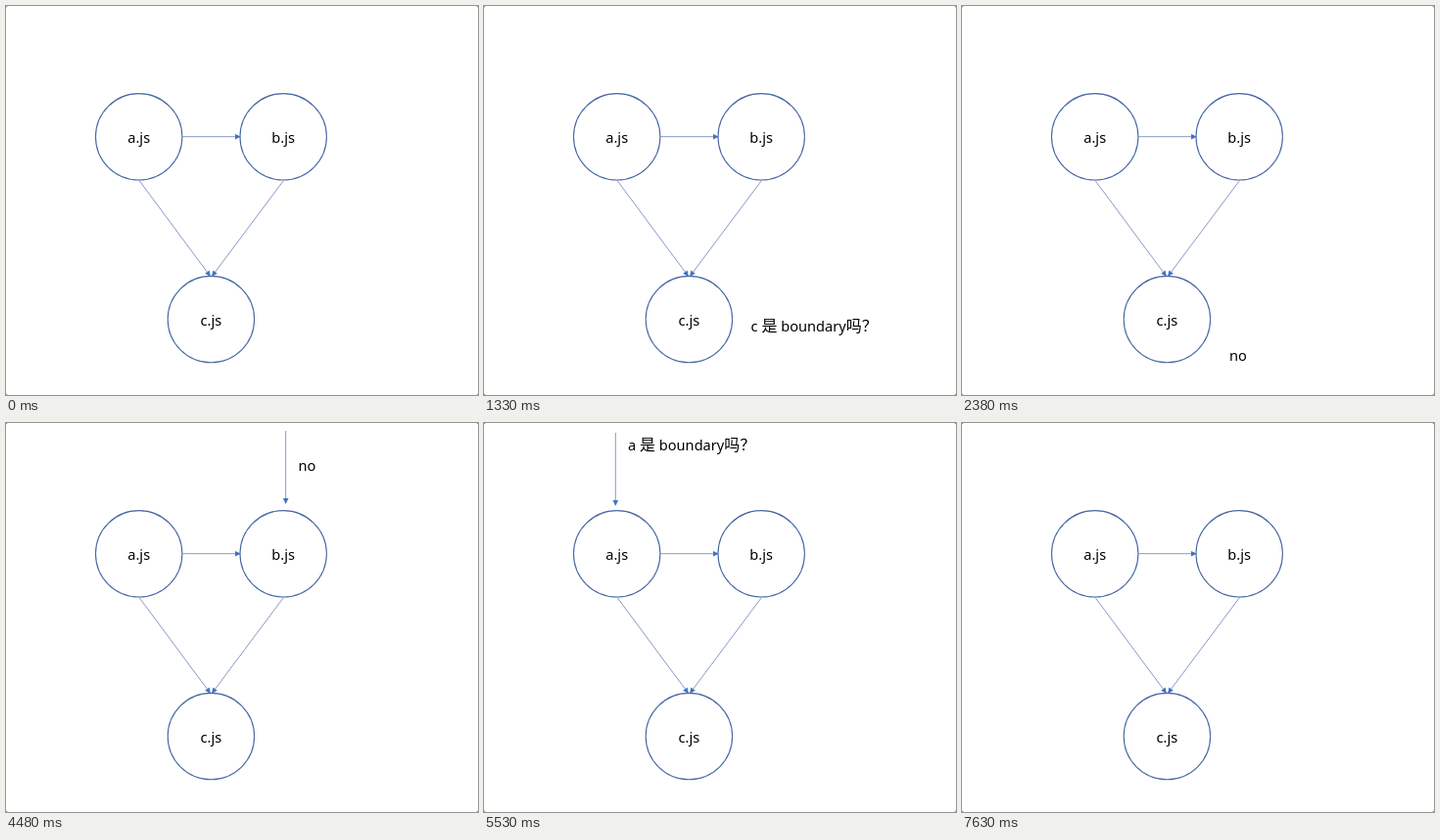
An HTML page for the animation above (8 s loop, 482 px wide and 398 px high).

```html
<!DOCTYPE html>
<html lang="zh">
<head>
<meta charset="utf-8">
<title>Module update</title>
<style>
  html, body { margin: 0; width: 100%; height: 100%; overflow: hidden; background: #fff; }
  svg { display: block; width: 482px; height: 398px; }
  text { font: 14.6px "Noto Sans", "Noto Sans CJK SC", "Noto Sans CJK", sans-serif; fill: #000; white-space: pre; }
  .han { font: 16px "Noto Sans CJK SC", "Noto Sans CJK", sans-serif; }
  .node text { text-anchor: middle; }
  circle { fill: #fff; stroke: #4868a4; stroke-width: 1.1; }
  .line { stroke: #6680b8; stroke-width: .8; }
  .head { fill: #4472c4; }
</style>
</head>
<body>
<svg id="stage" viewBox="0 0 482 398"></svg>
<script>
const LOOP = 8000, FIRST = 280, STEP = 1050;
const stage = document.getElementById('stage');

function add(name, attrs, parent = stage, content = '') {
  const el = document.createElementNS('http://www.w3.org/2000/svg', name);
  for (const key in attrs) el.setAttribute(key, attrs[key]);
  el.textContent = content;
  parent.appendChild(el);
  return el;
}

function node(x, y, label) {
  const g = add('g', { class: 'node' });
  add('circle', { cx: x, cy: y, r: 44.2 }, g);
  add('text', { x, y: y + 6 }, g, label);
}

function arrow(x1, y1, x2, y2) {
  const g = add('g', {});
  const angle = Math.atan2(y2 - y1, x2 - x1);
  const bx = x2 - 5 * Math.cos(angle), by = y2 - 5 * Math.sin(angle);
  add('line', { class: 'line', x1, y1, x2: bx, y2: by }, g);
  add('path', {
    class: 'head', d: 'M0 0L-6-2.8V2.8Z',
    transform: `translate(${x2} ${y2}) rotate(${angle * 180 / Math.PI})`
  }, g);
  return g;
}

// Chinese runs are set slightly larger than the Latin ones.
function note(x, y, words) {
  const text = add('text', { x, y });
  for (const run of words.match(/[\u3000-\uffff]+|[^\u3000-\uffff]+/g))
    add('tspan', run.charCodeAt(0) > 0x2fff ? { class: 'han' } : {}, text, run);
  return text;
}

const ask = (x, y, name) => note(x, y, name + ' 是 boundary吗？');

// Corners of the rounded slide
add('path', {
  fill: '#666',
  d: 'M0 0H2Q0 0 0 2ZM482 0V2Q482 0 480 0ZM0 398V396Q0 398 2 398ZM482 398H480Q482 398 482 396Z'
});

node(135.7, 133.8, 'a.js');
node(283.2, 133.8, 'b.js');
node(209.4, 320.6, 'c.js');
arrow(180, 133.7, 240, 133.7);
arrow(136, 178.5, 209, 277);
arrow(283.5, 178.5, 210, 277);

// Each item is visible from one step up to, not including, another.
const items = [
  [0, 1, note(272.6, 302.5, 'c.js发生变化')],
  [1, 2, ask(272.6, 332.5, 'c')],
  [2, 3, note(273, 362.5, 'no')],
  [3, 5, arrow(285.7, 8, 285.7, 83)],
  [3, 4, ask(298, 24.5, 'b')],
  [4, 5, note(298.5, 48.5, 'no')],
  [5, 7, arrow(134.3, 10, 134.3, 85)],
  [5, 6, ask(147, 28.3, 'a')],
  [6, 7, note(148.8, 50.3, 'yes, hot.accept()')]
];

function draw(time) {
  const step = Math.floor((time % LOOP - FIRST) / STEP);
  for (const [from, to, el] of items)
    el.style.display = step >= from && step < to ? '' : 'none';
}

const start = performance.now();
function tick() {
  draw(performance.now() - start);
  requestAnimationFrame(tick);
}
draw(0);
requestAnimationFrame(tick);
</script>
</body>
</html>
```
